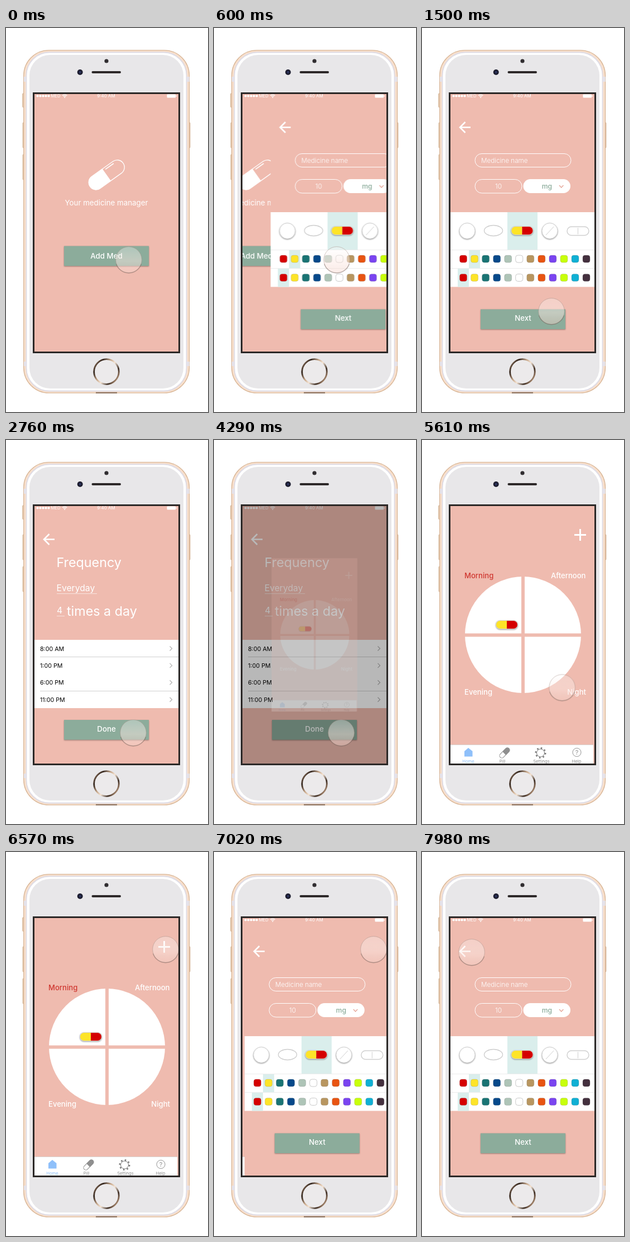
Write an HTML page that moves like this. It is 362 px wide and 686 px high and loops after 8 s.

```html
<!DOCTYPE html>
<html lang="en">
<head>
<meta charset="utf-8">
<title>Medicine manager</title>
<style>
  html, body { margin: 0; width: 100%; height: 100%; overflow: hidden; background: #fff; }
  svg { display: block; width: 100vw; height: 100vh; font-family: Inter, Roboto, sans-serif; }
  text { fill: #fff; }
  .bg { fill: #efbbaf; }
  .line { fill: none; stroke: #fff; }
  .button { fill: #8cac9b; filter: drop-shadow(0 1px 1.2px rgba(70, 50, 45, .5)); }
  .label { font-size: 13.3px; font-weight: 500; text-anchor: middle; }
  .big { font-size: 23.3px; }
  .mid { font-size: 15.7px; }
  .part { font-size: 13.1px; font-weight: 500; }
  .end { text-anchor: end; }
  .tab { font-size: 7.7px; text-anchor: middle; fill: #8f8f8f; }
  .pale { fill: #daeeec; }
  .outline { fill: #fff; stroke: #cfcfcf; }
  .raised { filter: drop-shadow(0 1px 1px rgba(0, 0, 0, .4)); }
  #home { transform-origin: 180px 348px; }
</style>
</head>
<body>
<svg viewBox="0 0 362 686">
  <defs>
    <clipPath id="screen"><rect x="51" y="118" width="258" height="460"/></clipPath>
    <linearGradient id="ring" x1="0" y1=".1" x2="1" y2=".8">
      <stop offset="0" stop-color="#a98a70"/><stop offset=".2" stop-color="#2e2119"/>
      <stop offset=".42" stop-color="#c8a88b"/><stop offset=".58" stop-color="#f6e6d6"/>
      <stop offset=".8" stop-color="#3a2a20"/><stop offset="1" stop-color="#c9a587"/>
    </linearGradient>
    <linearGradient id="glass" x1="0" y1="0" x2="0" y2="1">
      <stop offset="0" stop-color="#fff" stop-opacity=".3"/>
      <stop offset=".55" stop-color="#fbe9e4" stop-opacity=".5"/>
      <stop offset="1" stop-color="#f6d4cb" stop-opacity=".42"/>
    </linearGradient>

    <g id="capsule" class="raised">
      <rect x="-20" y="-8" width="40" height="16" rx="8" fill="#d7d3cc"/>
      <path d="M0-7H-12a7 7 0 0 0 0 14H0z" fill="#fde428"/>
      <path d="M0-7H12a7 7 0 0 1 0 14H0z" fill="#d50000"/>
    </g>
    <path id="back" class="line" d="M87 177.500H68M77.500 168L68 177.500l9.500 9.500" stroke-width="2.600"/>

    <g id="status">
      <g id="signal" fill="#fff"></g>
      <text x="80.500" y="124.300" font-size="7.600">MED</text>
      <g class="line" stroke-width="1.200">
        <path d="M101 120.500q4.200-3.400 8.400 0M102.700 122.300q2.500-2 5 0"/>
      </g>
      <circle cx="105.200" cy="124" r="1" fill="#fff"/>
      <text x="179.500" y="124.300" font-size="8" text-anchor="middle">9:40 AM</text>
      <rect x="288.500" y="118.500" width="15.500" height="6" rx="1" fill="#fff"/>
      <rect x="304.700" y="120.200" width="1.300" height="2.600" fill="#fff"/>
    </g>

    <g id="form">
      <rect class="bg" x="51" y="118" width="258" height="460"/>
      <use href="#back"/>
      <rect class="line" x="95" y="224.500" width="172" height="24" rx="12"/>
      <text x="106" y="241" font-size="11.700" font-weight="300">Medicine name</text>
      <rect class="line" x="95" y="270.500" width="84" height="24.500" rx="12.250"/>
      <text x="137" y="287" font-size="12" font-weight="300" text-anchor="middle">10</text>
      <rect x="181.500" y="270" width="84.500" height="25" rx="12.500" fill="#fff"/>
      <text x="224" y="286.500" font-size="12.200" font-weight="500" text-anchor="middle" style="fill:#8cac9b">mg</text>
      <path d="M246 281l3.700 4 3.700-4" fill="none" stroke="#e5a597" stroke-width="1.300"/>
      <rect x="51" y="329" width="258" height="133.500" fill="#fff"/>
      <path class="pale" d="M153 329h54v67h-54zM84 396h20v33.500H84zM64 430h20v32.500H64z"/>
      <path d="M51 396.500H309M51 429.500H309" stroke="#ececec"/>
      <g class="outline raised">
        <circle cx="81" cy="362.500" r="14"/>
        <circle cx="229" cy="362.500" r="14"/>
      </g>
      <g class="outline">
        <ellipse cx="128" cy="362" rx="16.500" ry="9.500" stroke-width="1.400"/>
        <path d="M222 370l14-15"/>
        <rect x="260" y="355" width="39" height="15.500" rx="7.750" stroke-width="1.400"/>
        <path d="M279.500 357v11.500"/>
      </g>
      <use href="#capsule" x="179.500" y="362"/>
      <g id="swatches"></g>
      <rect class="button" x="105" y="502.500" width="152" height="35.500"/>
      <text class="label" x="181" y="523">Next</text>
    </g>
  </defs>

  <!-- phone body -->
  <g fill="#ecd3bd" stroke="#c9a684" stroke-width=".7">
    <rect x="29.500" y="117" width="4" height="24.500" rx="1"/>
    <rect x="30" y="169" width="4" height="45" rx="1"/>
    <rect x="30" y="226" width="4" height="45" rx="1"/>
    <rect x="326" y="169" width="4" height="45" rx="1"/>
  </g>
  <rect x="31.700" y="39.700" width="296.800" height="612.300" rx="45" fill="#f7dfcc" stroke="#d3ad8b" stroke-width="1.100"/>
  <path d="M32 87h5v9h-5zM323.500 87h5v9h-5zM32 596h5v8h-5zM323.500 596h5v8h-5z" fill="#e6e4ec"/>
  <rect x="36.500" y="43.500" width="287" height="605" rx="41" fill="#fff" stroke="#dedce6" stroke-width="1.800"/>
  <rect x="42" y="48" width="276" height="596" rx="37" fill="#e8e7e9"/>
  <path d="M161 651.600h38" stroke="#765b48" stroke-width="1.600"/>
  <circle cx="180" cy="59" r="3.600" fill="#302d30"/>
  <circle cx="132.700" cy="79" r="5" fill="#1d1e30"/>
  <circle cx="132.700" cy="79" r="2" fill="#2c3560"/>
  <rect x="153.500" y="77" width="52.500" height="4" rx="2" fill="#2d2929"/>
  <circle cx="180" cy="614" r="22.300" fill="#eceaeb" stroke="url(#ring)" stroke-width="2.800"/>
  <rect x="48" y="115" width="264" height="466" fill="#2b2827"/>

  <g clip-path="url(#screen)">
    <g id="start">
      <rect class="bg" x="51" y="118" width="258" height="460"/>
      <g transform="translate(180.300 262.300) rotate(-35.400)">
        <rect class="line" x="-36.300" y="-13" width="72.600" height="26" rx="13" stroke-width="1.300"/>
        <path d="M0-13.500H-23.300a13.500 13.500 0 0 0 0 27H0z" fill="#fff"/>
        <path class="line" d="M4-9.300H22" stroke-width="1.600"/>
      </g>
      <text x="180" y="317" font-size="13.300" text-anchor="middle">Your medicine manager</text>
      <rect class="button" x="104" y="389.500" width="152" height="35.500"/>
      <text class="label" x="180" y="412">Add Med</text>
    </g>

    <use id="formA" href="#form"/>

    <g id="frequency">
      <rect class="bg" x="51" y="118" width="258" height="460"/>
      <use href="#back"/>
      <text class="big" x="90.500" y="227">Frequency</text>
      <text class="mid" x="90.500" y="269.500">Everyday</text>
      <text class="mid" x="91" y="310">4</text>
      <text class="big" x="109" y="314">times a day</text>
      <path d="M91 274.500h72M91 314.500h14" stroke="#fff" stroke-opacity=".6"/>
      <rect x="51" y="357" width="258" height="122" fill="#fff"/>
      <path d="M61 387.500H309M61 448.500H309" stroke="#cfcfcf"/>
      <g id="times"></g>
      <rect class="button" x="104" y="500" width="152" height="35.500"/>
      <text class="label" x="180" y="521">Done</text>
    </g>

    <use href="#status"/>
    <rect id="dim" x="51" y="118" width="258" height="460"/>

    <g id="home">
      <rect class="bg" x="51" y="118" width="258" height="460"/>
      <path class="line" d="M273 169.500h21M283.500 159v21" stroke-width="3"/>
      <circle cx="181" cy="348" r="104" fill="#fff"/>
      <path d="M181 242V454M75 348.500H287" stroke="#efbbaf" stroke-width="6"/>
      <text class="part" x="76" y="247" style="fill:#cf3730">Morning</text>
      <text class="part end" x="293.500" y="247">Afternoon</text>
      <text class="part" x="76" y="455">Evening</text>
      <text class="part end" x="294" y="455">Night</text>
      <use href="#capsule" x="152" y="330"/>
      <rect x="51" y="544.500" width="256" height="34" fill="#fff"/>
      <path d="M51 544.500h256" stroke="#d9d0ce"/>
      <path d="M76 556l7-6 7.500 6v9.500H76z" fill="#8fc0fa"/>
      <g transform="translate(148 559) rotate(-45)">
        <rect x="-11" y="-4" width="22" height="8" rx="4" fill="#fff" stroke="#8f8f8f"/>
        <path d="M-1-4.500H7a4.500 4.500 0 0 1 0 9H-1z" fill="#8f8f8f"/>
      </g>
      <g fill="none" stroke="#777">
        <circle cx="212.500" cy="559" r="8.700" stroke-width="2.600" stroke-dasharray="2.600 4.233"/>
        <circle cx="212.500" cy="559" r="7" fill="#fff"/>
        <circle cx="277.500" cy="558" r="7.500" stroke-width=".8"/>
      </g>
      <text class="tab" x="277.500" y="562" style="font-size:11px">?</text>
      <text class="tab" x="83" y="576.500" style="fill:#8fc0fa">Home</text>
      <text class="tab" x="144" y="576.500">Pill</text>
      <text class="tab" x="214" y="576.500">Settings</text>
      <text class="tab" x="277" y="576.500">Help</text>
    </g>

    <use id="formB" href="#form"/>
    <use id="statusB" href="#status"/>

    <g id="touch">
      <circle r="23.300" fill="url(#glass)" stroke="#a58f88" stroke-opacity=".55" stroke-width=".9"/>
      <path d="M-22.500 7.500A23.700 23.700 0 0 0 22.500 7.500" fill="none" stroke="#6d5852" stroke-opacity=".4" stroke-width="1.300"/>
    </g>
  </g>
</svg>

<script>
const LOOP = 8000, WIDTH = 258;
const $ = id => document.getElementById(id);
const fill = (id, items, draw) => { $(id).innerHTML = items.map(draw).join(''); };

fill('signal', [0, 1, 2, 3, 4], i => `<circle cx="${56.5 + i * 5}" cy="121.500" r="2.100"/>`);

const colors = ['#d50000', '#fde428', '#1a7474', '#06498a', '#aec4b7', '#fff',
  '#b89660', '#e85412', '#7a44f0', '#c8ff0a', '#10b0d4', '#44303e'];
fill('swatches', [406, 439.5], y => colors.map((color, i) =>
  `<rect x="${67.5 + i * 20.05}" y="${y}" width="13" height="13" rx="4" fill="${color}"
    stroke="${color === '#fff' ? '#bbb' : 'rgba(90,90,90,.25)'}" stroke-width=".8"/>`).join(''));

fill('times', ['8:00 AM', '1:00 PM', '6:00 PM', '11:00 PM'], (label, i) => {
  const y = 372.5 + i * 30.4;
  return `<text x="61" y="${y + 4}" font-size="10.700" style="fill:#000">${label}</text>
    <path d="M293.500 ${y - 4}l4 4-4 4" fill="none" stroke="#b5b5b5" stroke-width="1.300"/>`;
});

const start = document.timeline.currentTime ?? 0;

// Each step: [ms, properties, easing to the next step]
function play(id, steps) {
  const frames = steps.map(([ms, props, easing = 'linear']) => ({ offset: ms / LOOP, easing, ...props }));
  const motion = $(id).animate(frames, { duration: LOOP, iterations: Infinity });
  motion.startTime = start;
}

const slide = x => ({ transform: `translate(${x}px, 0px)` });
const place = (x, y) => ({ transform: `translate(${x}px, ${y}px)` });
const pose = (x, scale, opacity) => ({ transform: `translate(${x}px, 0px) scale(${scale})`, opacity });
const fade = opacity => ({ opacity });
const here = slide(0), right = slide(WIDTH), left = slide(-WIDTH / 2);

play('start', [[0, here], [350, here, 'ease'], [850, left], [LOOP, left]]);
play('formA', [[0, right], [350, right, 'ease'], [850, here],
  [1750, here, 'ease'], [2250, left], [LOOP, left]]);
play('frequency', [[0, right], [1750, right, 'ease'], [2250, here], [LOOP, here]]);
play('dim', [[0, fade(0)], [4140, fade(0), 'ease-out'], [4640, fade(.62)], [LOOP, fade(.62)]]);
play('home', [[0, pose(0, .5, 0)], [4140, pose(0, .5, 0), 'ease-in-out'], [4640, pose(0, 1, 1)],
  [6600, pose(0, 1, 1), 'ease'], [7100, pose(-WIDTH / 2, 1, 1)], [LOOP, pose(-WIDTH / 2, 1, 1)]]);
play('formB', [[0, right], [6600, right, 'ease'], [7100, here], [LOOP, here]]);
play('statusB', [[0, fade(0)], [6600, fade(0)], [6600, fade(1)], [LOOP, fade(1)]]);
play('touch', [
  [0, place(220, 414)], [850, place(220, 414), 'ease-in-out'],
  [1400, place(232, 506)], [2200, place(232, 506), 'ease-in-out'],
  [2650, place(228, 523)], [5250, place(228, 523), 'ease-in'],
  [5610, place(251, 443), 'ease-out'], [6200, place(286, 174)],
  [7200, place(286, 174), 'ease-in-out'], [7850, place(89, 179)], [LOOP, place(89, 179)]
]);
</script>
</body>
</html>
```
